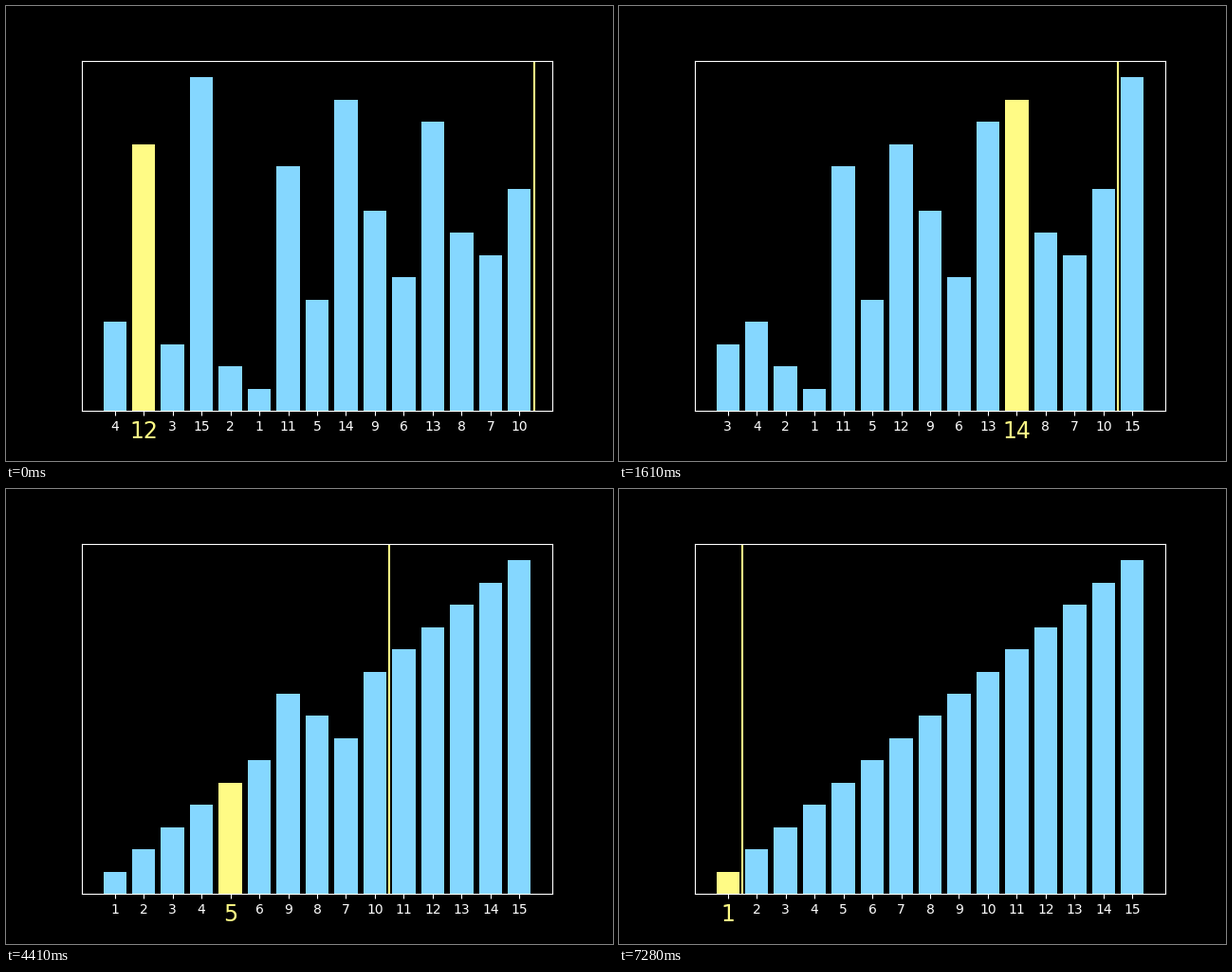
A matplotlib script that plays this animation: 640x480 px, repeating every 7.35 s.

```python
import matplotlib.pyplot as plt
from matplotlib.animation import FuncAnimation

BLUE = "#85d7ff"
YELLOW = "#fffb85"
START = [4, 12, 3, 15, 2, 1, 11, 5, 14, 9, 6, 13, 8, 7, 10]
N = len(START)


def bubble_steps(values):
    """Yield (values, cursor, boundary) just before each comparison."""
    values = list(values)
    for end in range(N - 1, 0, -1):
        for j in range(end):
            yield values[:], j, end + 0.5
            if values[j] > values[j + 1]:
                values[j], values[j + 1] = values[j + 1], values[j]
    yield values[:], 0, 0.5


# The animation opens with the cursor already on the second bar.
steps = list(bubble_steps(START))[1:]

plt.style.use("dark_background")
plt.rcParams["font.family"] = "DejaVu Sans"
fig, ax = plt.subplots(figsize=(6.4, 4.8), dpi=100)
fig.set_facecolor("black")


def update(i):
    values, cursor, boundary = steps[i]
    ax.clear()
    ax.set_facecolor("black")
    bars = ax.bar(range(N), values, color=BLUE)
    bars[cursor].set_facecolor(YELLOW)
    wall = ax.axvline(boundary, color=YELLOW, lw=1.5)
    ax.set_yticks([])
    ax.set_ylim(0, N * 1.05)
    ax.set_xticks(range(N), [str(v) for v in values])
    label = ax.get_xticklabels()[cursor]
    label.set_color(YELLOW)
    label.set_fontsize(17)
    return [*bars, wall]


anim = FuncAnimation(fig, update, frames=len(steps), interval=70,
                     repeat=True, repeat_delay=0, blit=False)
plt.show()
```
